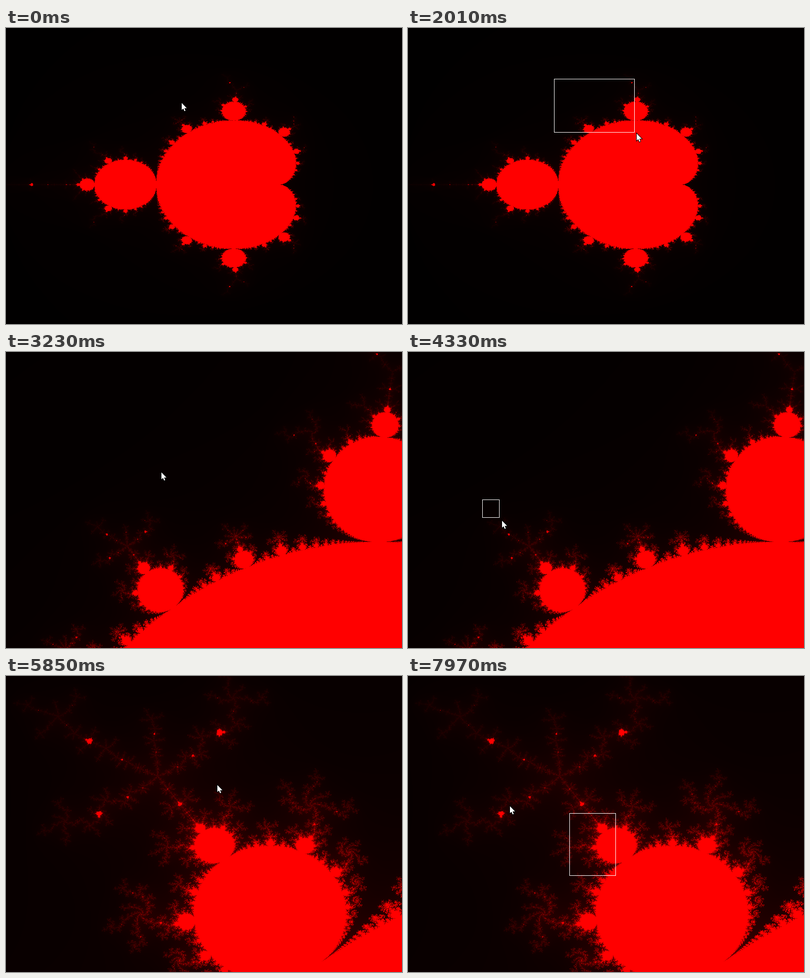
Animation, 800 px wide and 600 px high, one loop 8000 ms. Source, as an HTML page with a canvas:

```html
<!DOCTYPE html>
<html lang="en">
<head>
<meta charset="utf-8">
<title>Mandelbrot zoom</title>
<style>
  html, body { margin: 0; width: 100%; height: 100%; overflow: hidden; background: #000; }
  canvas { display: block; }
</style>
</head>
<body>
<canvas id="stage" width="800" height="600"></canvas>
<script>
const W = 800, H = 600, LOOP = 8000, MAX = 255;
// The stage is a window onto a 1000 x 800 plane.
const PLANE_W = 1000, PLANE_H = 800, OFF_X = 9, OFF_Y = 83.05;

const stage = document.getElementById('stage').getContext('2d');

// Start of each view and the corner where its selection is pressed.
const scenes = [
  { at: 0, press: [295, 103], zoom: [215, 142] },
  { at: 3230, press: [150, 299], zoom: [296, 259] },
  { at: 5850, press: [326, 278] }
];

// Pointer moves: first step, last step, step count, end point, dragging.
const moves = [
  [0, 0, 1, 355, 152],
  [790, 790, 1, 365, 151],
  [890, 1510, 7, 295, 103],
  [1610, 2310, 8, 512, 247, true],
  [2610, 2930, 4, 314, 244],
  [3330, 3330, 1, 332, 210],
  [3530, 4230, 8, 150, 299],
  [4330, 4330, 1, 190, 342, true],
  [4450, 5150, 8, 448, 560, true],
  [5350, 5550, 3, 427, 221],
  [6270, 6370, 2, 326, 278],
  [6470, 6770, 4, 377, 341, true],
  [6870, 7470, 7, 420, 405, true],
  [7670, 7970, 4, 206, 264]
];

const easeOut = u => 1 - (1 - u) ** 1.5;

function expand(list) {
  const steps = [];
  let from = { x: 0, y: 0 };
  for (const [first, last, count, x, y, drag] of list) {
    for (let i = 1; i <= count; i++) {
      const k = easeOut(i / count);
      steps.push({
        t: count > 1 ? first + (last - first) * (i - 1) / (count - 1) : first,
        x: Math.round(from.x + (x - from.x) * k),
        y: Math.round(from.y + (y - from.y) * k),
        drag
      });
    }
    from = { x, y };
  }
  return steps;
}

const steps = expand(moves);

function escapeCount(cr, ci) {
  let x = 0, y = 0, xx = 0, yy = 0, n = 0;
  while (n < MAX && xx + yy <= 4) {
    y = 2 * x * y + ci;
    x = xx - yy + cr;
    xx = x * x;
    yy = y * y;
    n++;
  }
  return n;
}

function renderSet({ re, im, sx, sy }) {
  const canvas = document.createElement('canvas');
  canvas.width = W;
  canvas.height = H;
  const ctx = canvas.getContext('2d');
  const image = ctx.createImageData(W, H);
  for (let py = 0, i = 0; py < H; py++) {
    const ci = im - (py + OFF_Y) / sy;
    for (let px = 0; px < W; px++, i += 4) {
      image.data[i] = escapeCount(re + (px + OFF_X) / sx, ci);
      image.data[i + 3] = 255;
    }
  }
  ctx.putImageData(image, 0, 0);
  return canvas;
}

function buildScenes() {
  let view = { re: -2, im: 2, sx: PLANE_W / 4, sy: PLANE_H / 4 };
  for (const scene of scenes) {
    scene.picture = renderSet(view);
    if (!scene.zoom) break;
    const [x, y] = scene.press, [w, h] = scene.zoom;
    view = {
      re: view.re + (x + 1 + OFF_X) / view.sx,
      im: view.im - (y + 1 + OFF_Y) / view.sy,
      sx: view.sx * PLANE_W / w,
      sy: view.sy * PLANE_H / h
    };
  }
}

const lastIndex = (list, test) => {
  let i = list.length - 1;
  while (i > 0 && !test(list[i])) i--;
  return i;
};

// The selection corner trails the pointer until the drag ends.
function corner(i) {
  const lag = steps[i + 1].drag ? 0.13 : 0;
  return ['x', 'y'].map(k =>
    Math.round(steps[i][k] - 1 - lag * (steps[i][k] - steps[i - 1][k])));
}

const arrow = new Path2D('M0 0V14L3.2 11.2L5.4 16.6L7.6 15.7L5.4 10.4H10.2Z');

function drawPointer({ x, y }) {
  stage.save();
  stage.translate(x, y);
  stage.lineWidth = 2;
  stage.strokeStyle = '#000';
  stage.stroke(arrow);
  stage.fillStyle = '#fff';
  stage.fill(arrow);
  stage.restore();
}

function draw(t) {
  const scene = scenes[lastIndex(scenes, s => s.at <= t)];
  stage.drawImage(scene.picture, 0, 0);

  const i = lastIndex(steps, s => s.drag && s.t <= t);
  if (i > 0 && steps[i].t >= scene.at) {
    const [x, y] = scene.press, [x2, y2] = corner(i);
    stage.lineWidth = 1;
    stage.strokeStyle = '#fff';
    stage.strokeRect(x + 0.5, y + 0.5, x2 - x, y2 - y);
  }

  drawPointer(steps[lastIndex(steps, s => s.t <= t)]);
}

buildScenes();
const start = performance.now();
function tick() {
  draw((performance.now() - start) % LOOP);
  requestAnimationFrame(tick);
}
tick();
</script>
</body>
</html>
```
